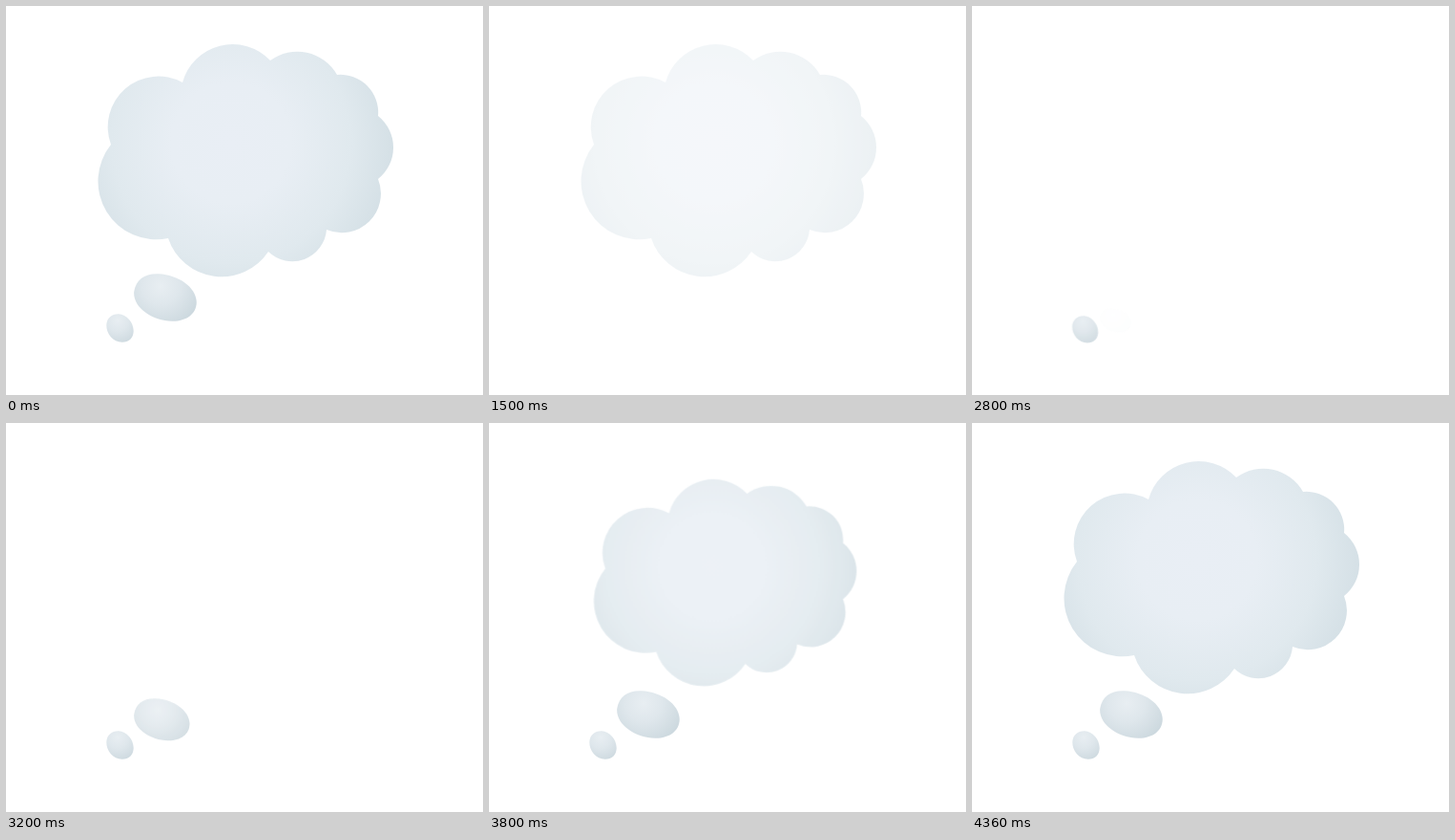
Recreate the animation shown at these times as an HTML page without scripts. Size 500 px wide and 407 px high, loop 9.36 s.

```html
<!DOCTYPE html>
<html lang="en">
<head>
<meta charset="utf-8">
<title>Thought bubble</title>
<style>
  html, body { margin: 0; width: 100%; height: 100%; overflow: hidden; background: #fff; }
  svg { display: block; width: 100vw; height: 100vh; }

  .fade { animation: 9360ms linear infinite; }
  .grow { animation: grow 9360ms linear infinite; }

  /* Each bubble swells away from its own anchor point */
  .small { animation-name: fade-small; }
  .small .grow { transform-origin: 98px 367px; animation-delay: -7260ms; }
  .medium { animation-name: fade-medium; }
  .medium .grow { transform-origin: 134px 353px; animation-delay: -6560ms; }
  .cloud { animation-name: fade-cloud; }
  .cloud .grow { transform-origin: 218px 210.5px; animation-delay: -5960ms; }

  @keyframes grow {
    0% { transform: scale(.5); opacity: .05; animation-timing-function: steps(2); }
    2.136% { transform: scale(.793); opacity: .67; animation-timing-function: steps(2); }
    4.273% { transform: scale(.89); opacity: .82; animation-timing-function: steps(2); }
    6.41% { transform: scale(.9455); opacity: .91; animation-timing-function: steps(2); }
    8.547% { transform: scale(.97); opacity: .95; }
    10.256%, 100% { transform: none; opacity: 1; }
  }
  @keyframes fade-small {
    0% { opacity: 1; }
    1.068% { opacity: 1; animation-timing-function: steps(7); }
    8.547% { opacity: 0; animation-timing-function: step-end; }
    22.435%, 100% { opacity: 1; }
  }
  @keyframes fade-medium {
    0% { opacity: 1; }
    4.273% { opacity: 1; animation-timing-function: steps(8); }
    12.82% { opacity: 0; animation-timing-function: step-end; }
    29.914%, 100% { opacity: 1; }
  }
  @keyframes fade-cloud {
    0% { opacity: 1; }
    10.683% { opacity: 1; animation-timing-function: steps(9); }
    20.299% { opacity: 0; animation-timing-function: step-end; }
    36.324%, 100% { opacity: 1; }
  }
</style>
</head>
<body>
<svg viewBox="0 0 500 407" preserveAspectRatio="none">
  <defs>
    <radialGradient id="sky" gradientUnits="userSpaceOnUse" cx="236" cy="143" r="180">
      <stop offset="0" stop-color="#e9eef5"/>
      <stop offset=".35" stop-color="#e8eef4"/>
      <stop offset=".7" stop-color="#e0e9ee"/>
      <stop offset="1" stop-color="#d2dee4"/>
    </radialGradient>
    <radialGradient id="puff" gradientUnits="userSpaceOnUse" cx="162" cy="293" r="43">
      <stop offset="0" stop-color="#e8eef2"/>
      <stop offset=".45" stop-color="#dfe7ec"/>
      <stop offset="1" stop-color="#cdd9df"/>
    </radialGradient>
    <radialGradient id="dot" gradientUnits="userSpaceOnUse" cx="117" cy="329" r="25">
      <stop offset="0" stop-color="#e8eef2"/>
      <stop offset=".45" stop-color="#dfe7ec"/>
      <stop offset="1" stop-color="#cdd9df"/>
    </radialGradient>
  </defs>

  <g class="fade cloud">
    <g class="grow">
      <path fill="url(#sky)" d="M110 145
        A53 53 0 0 1 185 80
        A54.5 54.5 0 0 1 277 57
        A48 48 0 0 1 347 72
        A39.5 39.5 0 0 1 390 115
        A42 42 0 0 1 390 181
        A41 41 0 0 1 336 234
        A36 36 0 0 1 275 257
        A59 59 0 0 1 170 243
        A61 61 0 0 1 110 145Z"/>
    </g>
  </g>

  <g class="fade medium">
    <g class="grow" fill="url(#puff)">
      <path d="M134.2 299
        C136 286 146 279.5 160 280.3
        C181 281.5 198.500 294 199.700 309
        C200.300 322 189 330 174 329.700
        C153 329 133 315.500 134.2 299Z"/>
    </g>
  </g>

  <g class="fade small">
    <g class="grow" fill="url(#dot)">
      <path d="M105.300 334
        C105.500 326.500 111 322 118 322.200
        C126.500 322.500 133.700 331 133.700 340
        C133.600 347.500 128.500 352 121.500 351.800
        C112.500 351.500 105 343 105.300 334Z"/>
    </g>
  </g>
</svg>
</body>
</html>
```
